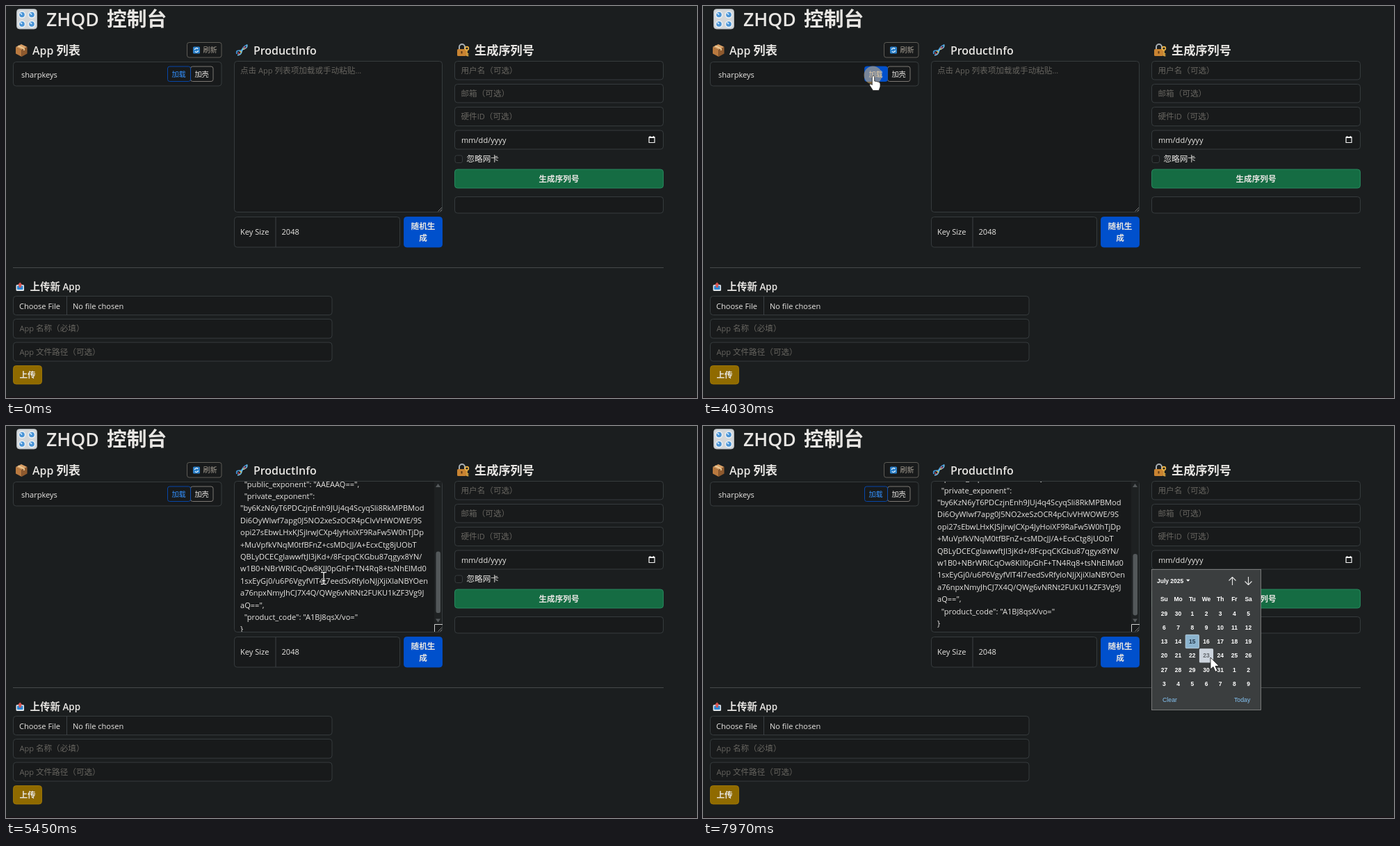
Animation, 994 px wide and 564 px high, one loop 8000 ms. Source, as an HTML page:

```html
<!DOCTYPE html>
<html lang="zh-CN">
<head>
<meta charset="utf-8">
<title>控制台</title>
<style>
html, body { margin: 0; width: 100%; height: 100%; overflow: hidden; background: #1b1e1f; }
svg { display: block; width: 100vw; height: 100vh; }
text { font-family: "Open Sans", "Noto Sans CJK SC", "Noto Sans CJK JP", "Noto Sans CJK", sans-serif; white-space: pre; }
.cal text { font-family: "Liberation Sans", Arial, sans-serif; }
</style>
</head>
<body>
<svg id="stage" viewBox="0 0 994 564"></svg>
<script>
const INK = '#e8e6e3', DIM = '#66645f', LINE = '#3c4144', FIELD = '#181a1b';
const BODY = 11.6, SMALL = 10.15, LINE_H = 17.39, MAX_SCROLL = 226.4;

// Latin glyphs are set slightly smaller than the Chinese ones beside them.
const text = (x, y, str, { size = BODY, fill = INK, weight = 400, anchor = 'start', id = '' } = {}) =>
  `<text ${id && `id="${id}"`} x="${x}" y="${y}" fill="${fill}" font-size="${size * (weight > 500 ? .925 : .953)}" font-weight="${weight}" text-anchor="${anchor}">` +
  str.replace(/[\u3000-\u9fff\uff00-\uffef]+/g, run => `<tspan font-size="${size}">${run}</tspan>`) + '</text>';
const box = (x1, y1, x2, y2, { fill = FIELD, stroke = LINE, r = 4, id = '' } = {}) =>
  `<rect ${id && `id="${id}"`} x="${x1}" y="${y1}" width="${x2 - x1}" height="${y2 - y1}" rx="${r}" fill="${fill}" stroke="${stroke}" stroke-width=".85"/>`;
const path = (d, fill, stroke = 'none', width = 1) =>
  `<path d="${d}" fill="${fill}" stroke="${stroke}" stroke-width="${width}" stroke-linejoin="round"/>`;
const field = (x1, y1, x2, y2, hint) =>
  box(x1, y1, x2, y2) + text(x1 + 9, (y1 + y2) / 2 + 4, hint, { fill: DIM });

// ---- icons ----
const knob = (x, y) =>
  `<circle cx="${x}" cy="${y}" r="5.3" fill="#eef2f4"/><circle cx="${x}" cy="${y}" r="3.8" fill="#4a94d6"/>` +
  path(`M${x} ${y}l-2.4-2.6`, 'none', '#e4f4ff', 1.5);
const icons =
  box(15.5, 4.5, 44.5, 33, { fill: '#d3d7da', stroke: '#b7bdc1', r: 4 }) +
  [[23, 12.5], [37, 12.5], [23, 26], [37, 26]].map(p => knob(...p)).join('') +
  path('M14 59L22 55L30.5 59L22.5 63Z', '#d9a066') + path('M14 59L22.5 63V73L14 68.5Z', '#b9793f') +
  path('M30.5 59L22.5 63V73L30.5 68.5Z', '#8f5a2e') + path('M17.5 57.3L26 61.4V64', 'none', '#efd2a0', 1.6) +
  path('M332 69C330 61 338 66 339.500 63S341 58 347 56', 'none', '#3f8fd0', 1.8) +
  path('M333 70.500C340 71 338 65 340 63S348 62 346.500 55.500', 'none', '#6cc0ea', 1.8) +
  path('M333.500 67l3 2.500M342 58.500l3 2.500', 'none', '#e0556b', 1.3) +
  path('M336 64.500l2.500 2.500M341 61l2 1.500', 'none', '#f2c14e', 1.2) +
  path('M652 63V59a4 4 0 0 1 8 0V63', 'none', '#a9b0b4', 2) +
  box(649, 62, 662, 72, { fill: '#c98432', stroke: 'none', r: 1.5 }) +
  path('M655.500 65v3.500', 'none', '#5b3713', 2) +
  '<circle cx="663" cy="61" r="2.4" fill="none" stroke="#f0b545" stroke-width="1.6"/>' +
  path('M663 63.500V72M663 69h2.500M663 71.500h2.500', 'none', '#f0b545', 1.6) +
  box(14.5, 401, 26, 410, { fill: '#dfe6ea', stroke: 'none', r: 1.5 }) +
  box(16, 402.5, 24.5, 408, { fill: '#2f86d2', stroke: 'none', r: 1 }) +
  path('M20.200 397.500l3.500 4h-2v3.500h-3v-3.500h-2z', '#d9534f');
const refreshIcon = box(269, 58.5, 279, 68.5, { fill: '#2a7fc9', stroke: 'none', r: 1.5 }) +
  path('M271.500 63a2.500 2.500 0 0 1 4.600-1.200M276.500 64a2.500 2.500 0 0 1-4.600 1.200', 'none', '#fff', 1.2);

// ---- product info document ----
const productInfo = `{
  "algorithm": "RSA",
  "modulus":
"kT4vWq8ZbN2xLr7sYcJ0hUeP5mGdA9fXi3oQKzR
jD1SZZ5xHSB0YVFOpBSQmoWRc4kHA4jGdZBC5
8RXP0lgafkEEtboh0QHIDfCSrSee13nE8S6jotjNOEY6g
mfEakYI243MveUPP82NmlaHd0ceVU503nl8+iyuQo
mvDWjcM5rg7XTN3N2sPFbkuRPvn2tWSZ5CljRkKt+d
/aRxZ8bEq1VQTB1Ukj49amf/Gwh9iTE+/s+HDavMFvr
rp3X8BxjAvsB7NM3PfUYhbQpG/7C4G8UFtZUlWrscrq
2Yw5X/I6AvIIsAGv3cJ842gqQMcJ+NfbjBTDu8RQvxSl
Q==",
  "public_exponent": "AAEAAQ==",
  "private_exponent":
"by6KzN6yT6PDCzjnEnh9JUj4q4ScyqSli8RkMPBMod
Di6OyWlwf7apg0J5NO2xeSzOCR4pCIvVHWOWE/9S
opi27sEbwLHxKJSjlrwJCXp4JyHoiXF9RaFw5W0hTjDp
+MuVpfkVNqM0tfBFnZ+csMDcJJ/A+EcxCtg8jUObT
QBLyDCECglawwftJl3jKd+/8FcpqCKGbu87qgyx8YN/
w1B0+NBrWRICqOw8KIl0pGhF+TN4Rq8+tsNhElMd0
1sxEyGj0/u6P6VgyfVlT4I7eedSvRfyloNJjXjiXlaNBYOen
a76npxNmyJhCJ7X4Q/QWg6vNRNt2FUKU1kZF3Vg9J
aQ==",
  "product_code": "A1BJ8qsX/vo="
}`.split('\n');

const editor =
  box(328.5, 79.5, 627.5, 296.5, { id: 'area' }) +
  text(337, 97, '点击 App 列表项加载或手动粘贴...', { fill: DIM, id: 'hint' }) +
  `<g id="loaded"><clipPath id="view"><rect x="329" y="80" width="287" height="216"/></clipPath>
   <g clip-path="url(#view)"><g id="lines">${productInfo.map((s, i) => text(337, 97 + i * LINE_H, s)).join('')}</g></g>` +
  box(616, 80, 627, 285, { fill: '#1e2122', stroke: 'none', r: 0 }) +
  path('M618 88l3.500-5 3.500 5zM618 277.500l3.500 5 3.500-5z', '#55595b') +
  '<rect id="thumb" x="618.500" width="6.500" height="88.500" rx="3.2" fill="#53585a"/>' +
  path('M616.500 296V285.500H628', 'none', '#d0d0d0') + '</g>' +
  path('M621.500 295.500l5.500-5.500M624.500 295.500l2.500-2.500', 'none', '#8a8a8a', .9);

// ---- page ----
const heading = { size: 17.2, weight: 600 };
const buttonLabel = { anchor: 'middle', weight: 600 };
const page = icons +
  text(58, 28.5, 'ZHQD', { size: 28.8, weight: 600 }) + text(145, 28.5, '控制台', { size: 28.8, weight: 600 }) +
  text(38, 70, 'App 列表', heading) + text(356, 69.5, 'ProductInfo', heading) + text(674, 69.5, '生成序列号', heading) +
  box(260.5, 52.5, 310, 74, { stroke: '#6b6861', r: 3, id: 'refresh' }) + refreshIcon +
  text(283.5, 67, '刷新', { size: SMALL, fill: '#a39c91', id: 'refreshText' }) +
  box(10.5, 80.5, 310, 115) + text(22, 102.5, 'sharpkeys') +
  box(265.5, 87, 298, 108.5, { stroke: '#8f8a83', r: 3, id: 'pack' }) +
  box(232.5, 87, 265.5, 108.5, { stroke: '#0450c4', r: 3, id: 'load' }) +
  text(238.5, 101.5, '加载', { size: SMALL, fill: '#3391ff', id: 'loadText' }) +
  text(271.5, 101.5, '加壳', { size: SMALL, id: 'packText' }) +
  editor +
  box(328.5, 303.5, 566.5, 347) + path('M388 303.500V347', 'none', LINE) +
  text(337, 329, 'Key Size') + text(396.5, 329, '2048') +
  box(572.5, 303.5, 627.5, 347, { fill: '#0050cc', stroke: '#0050cc' }) +
  text(600, 320.5, '随机生', buttonLabel) + text(600, 338, '成', buttonLabel) +
  field(645.5, 79.5, 945.5, 106, '用户名（可选）') +
  field(645.5, 112.5, 945.5, 139, '邮箱（可选）') +
  field(645.5, 145.5, 945.5, 172.5, '硬件ID（可选）') +
  box(645.5, 179, 945.5, 206) + text(655, 196.5, 'mm/dd/yyyy') +
  path('M925 188.500h8v8h-8zM925 189.500h8M926.500 187v2M931.500 187v2', 'none', '#f4f4f4', 1.2) +
  box(646, 215, 656.5, 225.5, { r: 2.5 }) + text(662.5, 224.3, '忽略网卡') +
  box(645.5, 235, 945.5, 262, { fill: '#156c43', stroke: '#2b9164' }) +
  text(795.5, 252.5, '生成序列号', buttonLabel) +
  box(645.5, 274.5, 945.5, 298) +
  path('M10 376.500H946', 'none', '#45494a') +
  text(34.5, 409, '上传新 App', { size: 14.5, weight: 600 }) +
  box(10.5, 417.5, 469, 444.5) + path('M87.500 417.500V444.500', 'none', LINE) +
  text(19, 435.5, 'Choose File') + text(96, 435.5, 'No file chosen') +
  field(10.5, 450.5, 469, 478, 'App 名称（必填）') +
  field(10.5, 484, 469, 511, 'App 文件路径（可选）') +
  box(10.5, 517.5, 51.5, 544, { fill: '#8f6a00', stroke: '#a67c05' }) + text(31, 535, '上传', buttonLabel) +
  '<rect y="562.500" width="994" height="1.500" fill="#1c1419"/>';

// ---- date picker ----
const CELL_W = 20.2, CELL_H = 20.25, CAL_X = 653.3, CAL_Y = 259.4, TODAY = 16;
const calText = (x, y, str, more) => text(x, y, str, { size: 9.2, fill: '#fff', ...more });
const mid = { anchor: 'middle', weight: 700 };
const cellX = col => CAL_X + col * CELL_W, cellY = row => CAL_Y + row * CELL_H;
const dayNumber = i => new Date(2025, 5, 29 + i).getDate();
const calendar = '<g id="calendar" class="cal">' +
  box(645.5, 206.5, 802.5, 408.5, { fill: '#3b3e3f', stroke: '#858585', r: 0 }) +
  calText(653, 225.5, 'July 2025', { weight: 700 }) + path('M695 220.800h5.500l-2.750 3z', '#fff') +
  path('M761.500 229V217.500M756.500 222.500l5-5 5 5M784.500 217V228.500M779.500 223.500l5 5 5-5', 'none', '#e6e6e6', 1.1) +
  ['Su', 'Mo', 'Tu', 'We', 'Th', 'Fr', 'Sa'].map((d, i) => calText(cellX(i + .5), 252, d, mid)).join('') +
  box(cellX(2) + .5, cellY(2) + .5, cellX(3) - .5, cellY(3) - .5, { fill: '#8cb4cf', stroke: '#c3dcec', r: 1 }) +
  `<rect id="dayHover" width="${CELL_W}" height="${CELL_H}" rx="1.5" fill="#ccd4dd"/>` +
  Array.from({ length: 42 }, (_, i) =>
    calText(cellX(i % 7 + .5), cellY(Math.floor(i / 7)) + 13.3, String(dayNumber(i)), { ...mid, id: 'day' + i })).join('') +
  calText(661, 396.5, 'Clear', { fill: '#86c5f5' }) + calText(764, 396.5, 'Today', { fill: '#86c5f5' }) + '</g>';

// ---- pointer shapes, hot spot at 0,0 ----
const BEAM = 'M-4-8.500H-1.500Q0-8.500 0-7Q0-8.500 1.500-8.500H4M0-7.500V7.500M-4 8.500H-1.500Q0 8.500 0 7Q0 8.500 1.500 8.500H4M-2.500 3.500H2.500';
const pointer = '<circle id="click" r="13" fill="#d8b070" fill-opacity=".55"/><g id="pointer">' +
  `<g id="arrow">${path('M0 0V17L4 13.500L7 20.500L10 19.200L7 12.500H12.300Z', '#fff', '#111', .8)}</g>` +
  `<g id="hand">${path('M-1.700 1.500Q0 -1 1.700 1.500V8L4.500 8.500L7.500 9.300Q10 9.800 10 12V16L8 21.500H-.500L-5 14.500Q-6 12 -3.800 12L-1.700 13.500Z', '#fff', '#222', .8)}</g>` +
  `<g id="ibeam">${path(BEAM, 'none', '#000', 3)}${path(BEAM, 'none', '#fff', 1.3)}</g></g>`;

document.getElementById('stage').innerHTML = page + calendar + pointer;
const $ = id => document.getElementById(id);
const set = (id, attr, value) => $(id).setAttribute(attr, value);
const show = (id, on) => set(id, 'visibility', on ? 'visible' : 'hidden');

// ---- timeline: [ms, ...values] ----
const pointerKeys = [
  [190, 904, 532], [990, 313, 99], [1030, 313, 95], [1370, 286.5, 65], [2070, 286.5, 65], [2700, 245, 100],
  [4500, 245, 100], [4860, 457, 219], [5600, 457, 219], [6110, 352, 176], [6380, 283, 102],
  [6500, 283, 101], [6910, 929, 191.5], [7280, 929, 191.5], [7740, 730, 333]];
const scrollKeys = [
  [4940, 0], [5110, 72.4], [5170, 86.8], [5200, 86.8], [5280, 144.9], [5320, 144.9],
  [5450, 218], [5480, 218], [5560, MAX_SCROLL]];

function sample(keys, t) {
  const next = keys.findIndex(k => k[0] > t);
  if (next < 0) return keys[keys.length - 1].slice(1);
  if (next === 0) return keys[0].slice(1);
  const a = keys[next - 1], b = keys[next], u = (t - a[0]) / (b[0] - a[0]), e = u * u * (3 - 2 * u);
  return a.slice(1).map((v, i) => v + (b[i + 1] - v) * e);
}

function draw(t) {
  const [x, y] = sample(pointerKeys, t), [scroll] = sample(scrollKeys, t);
  const moved = t >= 190, loaded = t >= 4160, calendarOpen = t >= 7070;
  const over = (x1, y1, x2, y2) => moved && x >= x1 && x < x2 && y >= y1 && y < y2;

  const onRefresh = over(260, 52, 310, 74), onLoad = over(232, 87, 265, 109), onPack = over(265, 87, 298, 109);
  set('refresh', 'fill', onRefresh ? '#575855' : FIELD);
  set('refreshText', 'fill', onRefresh ? INK : '#a39c91');
  set('load', 'fill', onLoad ? '#0050cc' : FIELD);
  set('loadText', 'fill', onLoad ? INK : '#3391ff');
  set('pack', 'fill', onPack ? '#d5d2cc' : FIELD);
  set('packText', 'fill', onPack ? FIELD : INK);

  show('hint', !loaded);
  show('loaded', loaded);
  set('lines', 'transform', `translate(0 ${-scroll})`);
  set('thumb', 'y', 91 + scroll * .411);

  show('calendar', calendarOpen);
  const col = Math.floor((x - CAL_X) / CELL_W), row = Math.floor((y - CAL_Y) / CELL_H);
  const onDay = calendarOpen && col >= 0 && col < 7 && row >= 0 && row < 6;
  show('dayHover', onDay);
  set('dayHover', 'x', cellX(col));
  set('dayHover', 'y', cellY(row));
  for (let i = 0; i < 42; i++)
    set('day' + i, 'fill', onDay && i === row * 7 + col ? '#62676c' : i === TODAY ? '#24384a' : '#fff');

  const onGreen = over(calendarOpen ? 803 : 645, 235, 946, 262);
  const shape = onRefresh || onLoad || onPack || onGreen ? 'hand'
    : over(328, 79, 616, 297) || over(645, 79, 946, 173) ? 'ibeam' : 'arrow';
  for (const id of ['arrow', 'hand', 'ibeam']) show(id, moved && id === shape);
  set('pointer', 'transform', `translate(${x} ${y})`);
  set('click', 'transform', `translate(${x - .5} ${y - .5})`);
  show('click', t >= 1670 && t < 1770 || t >= 4030 && t < 4130);
}

function frame() {
  draw(performance.now() % 8000);
  requestAnimationFrame(frame);
}
frame();
</script>
</body>
</html>
```
